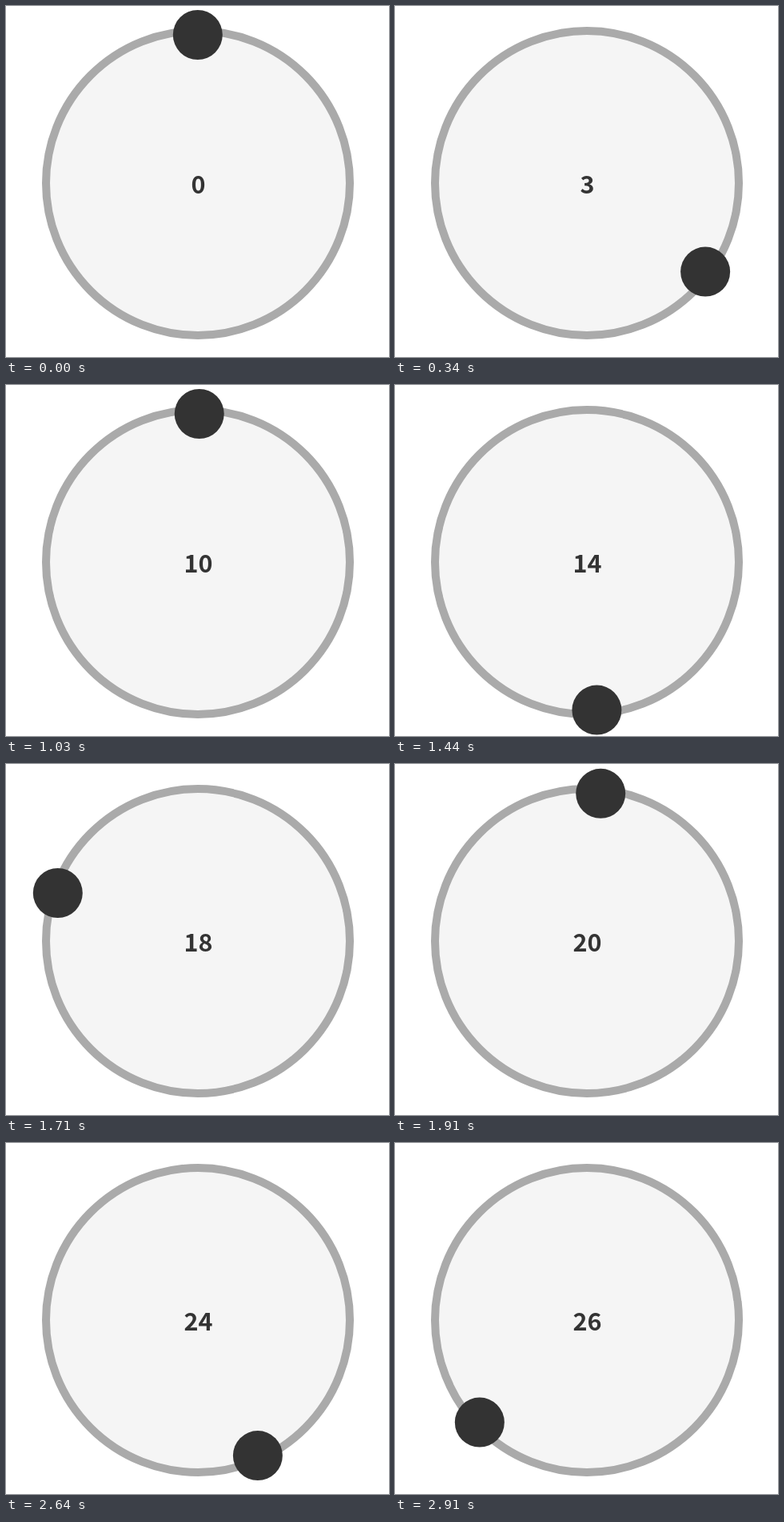
An HTML page that plays this animation: 479 by 438 pixels, repeating every 3170 ms.

```html
<!DOCTYPE html>
<html lang="en">
<head>
<meta charset="utf-8">
<title>Dial counter</title>
<style>
  html, body { margin: 0; width: 100%; height: 100%; overflow: hidden; background: #fff; }
  svg { display: block; width: 100%; height: 100%; }
  text { font: bold 30.5px "Noto Sans CJK JP", "Noto Sans CJK SC", "Noto Sans", sans-serif; text-anchor: middle; }
</style>
</head>
<body>
<svg viewBox="0 0 479 438">
  <circle cx="240" cy="221" r="190" fill="#f5f5f5" stroke="#aaa" stroke-width="10"/>
  <text id="count" x="240.5" y="233.5" fill="#333">0</text>
  <circle id="knob" r="31" fill="#333"/>
</svg>
<script>
const LOOP = 3170;
const STEP = 67.55; // the knob moves in discrete steps of this many ms
const CENTER = { x: 239.8, y: 221 };
const ORBIT = 185;
const DEGREES_PER_COUNT = 36;

// Turning points of the hand-driven spin: [step, total angle in degrees]
const keys = [
  [1, 0], [4, 83], [6, 168], [9, 233], [15, 360.6], [18, 466],
  [21, 536.1], [28, 725.4], [33, 810], [34, 830.4], [36, 830.4], [43, 946.4]
];

// Average angular speed between key i and the next one
function speed(i) {
  if (i < 0 || i >= keys.length - 1) return 0;
  return (keys[i + 1][1] - keys[i][1]) / (keys[i + 1][0] - keys[i][0]);
}

// Harmonic mean of the neighbouring speeds, so the curve never overshoots
function tangent(i) {
  const before = speed(i - 1), after = speed(i);
  return before && after ? 2 * before * after / (before + after) : 0;
}

function angleAt(step) {
  if (step <= keys[0][0]) return keys[0][1];
  const next = keys.findIndex(key => key[0] >= step);
  if (next < 0) return keys.at(-1)[1];
  const [fromStep, from] = keys[next - 1];
  const [toStep, to] = keys[next];
  const span = toStep - fromStep;
  const t = (step - fromStep) / span;
  return from + (to - from) * t * t * (3 - 2 * t)
    + span * t * (1 - t) * (tangent(next - 1) * (1 - t) - tangent(next) * t);
}

const knob = document.getElementById("knob");
const count = document.getElementById("count");

function draw(ms) {
  const angle = angleAt(Math.floor(ms / STEP));
  const radians = angle * Math.PI / 180;
  knob.setAttribute("cx", CENTER.x + ORBIT * Math.sin(radians));
  knob.setAttribute("cy", CENTER.y - ORBIT * Math.cos(radians));
  count.textContent = Math.floor(angle / DEGREES_PER_COUNT);
}

const start = performance.now();
function tick() {
  draw((performance.now() - start) % LOOP);
  requestAnimationFrame(tick);
}
tick();
</script>
</body>
</html>
```
